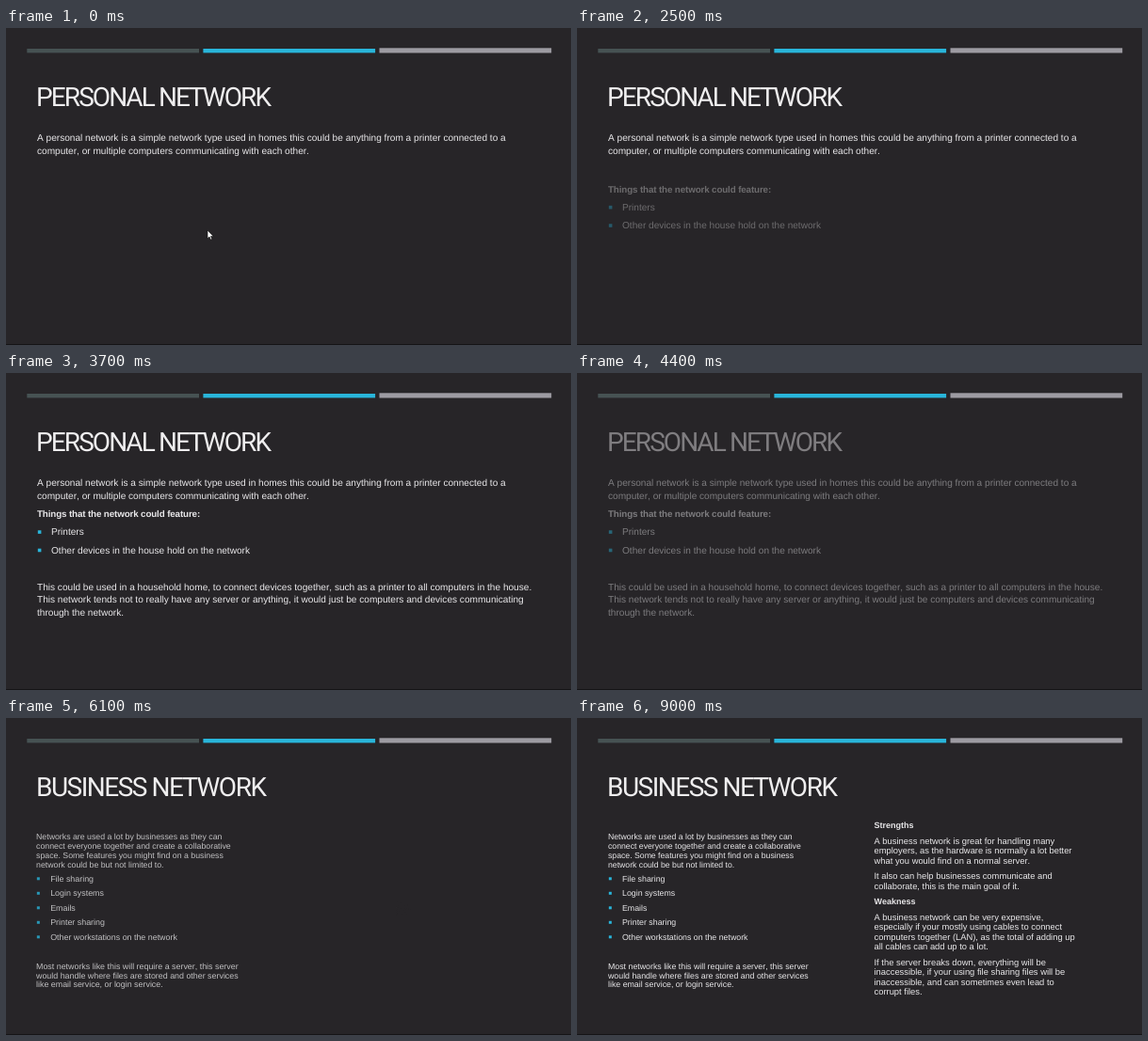
Write an HTML page with a canvas that moves like this. It is 600 px wide and 337 px high and loops after 9.1 s.

```html
<!DOCTYPE html>
<html lang="en">
<head>
<meta charset="utf-8">
<title>Network types</title>
<style>
html, body { margin: 0; width: 100%; height: 100%; overflow: hidden; background: #272528; }
canvas { display: block; width: 100vw; height: 100vh; }
</style>
</head>
<body>
<canvas id="stage" width="600" height="337"></canvas>
<script>
const ctx = document.getElementById('stage').getContext('2d');
const LOOP = 9100, STEP = 100;
const BG = '#272528', INK = '#e9e8ea', CYAN = '#29b5da';
const SANS = '"Liberation Sans", Arial, sans-serif';

// 0 before start, 1 after start + length, linear between
const ramp = (t, start, length) => Math.min(1, Math.max(0, (t - start) / length));

function text(str, x, y, font, spacing = 0, color = INK) {
  ctx.font = font;
  ctx.letterSpacing = spacing + 'px';
  ctx.fillStyle = color;
  ctx.fillText(str, x, y);
}

function lines(rows, x, y, lead, size) {
  rows.forEach((row, i) => text(row, x, y + i * lead, `${size}px ${SANS}`));
}

function bullets(rows, y, lead, size, dot) {
  rows.forEach((row, i) => {
    const base = y + i * lead;
    ctx.fillStyle = CYAN;
    ctx.fillRect(33.8, base - size * 0.33 - dot / 2, dot, dot);
    text(row, 48, base, `${size}px ${SANS}`);
  });
}

function title(str, spacing) {
  text(str, 32, 83, '28px Roboto, sans-serif', spacing, '#efeeef');
}

// Draws a part with its own opacity, shift and scale about a centre
function group(draw, { alpha = 1, dy = 0, sx = 1, sy = 1, cx = 0, cy = 0 } = {}) {
  if (alpha <= 0 || sx <= 0 || sy <= 0) return;
  ctx.save();
  ctx.globalAlpha = alpha;
  ctx.translate(cx, cy + dy);
  ctx.scale(sx, sy);
  ctx.translate(-cx, -cy);
  draw();
  ctx.restore();
}

function backdrop() {
  ctx.fillStyle = BG;
  ctx.fillRect(0, 0, 600, 337);
  ctx.fillStyle = '#151416';
  ctx.fillRect(0, 336, 600, 1);
  ['#465253', CYAN, '#9d9ba2'].forEach((color, i) => {
    ctx.fillStyle = color;
    ctx.fillRect(22.3 + i * 187.1, i === 2 ? 21.3 : 22, 182.7, i === 2 ? 5.2 : 4.4);
  });
}

function personalIntro() {
  title('PERSONAL NETWORK', -1.9);
  lines([
    'A personal network is a simple network type used in homes this could be anything from a printer connected to a',
    'computer, or multiple computers communicating with each other.'
  ], 33, 119.5, 14, 10.1);
}

function personalList() {
  text('Things that the network could feature:', 33, 153, `bold 9.8px ${SANS}`, -0.13);
  bullets(['Printers', 'Other devices in the house hold on the network'], 172.4, 19.4, 10.1, 3.6);
}

function personalUse() {
  lines([
    'This could be used in a household home, to connect devices together, such as a printer to all computers in the house.',
    'This network tends not to really have any server or anything, it would just be computers and devices communicating',
    'through the network.'
  ], 33, 230.6, 13.8, 10.1);
}

function businessLeft() {
  lines([
    'Networks are used a lot by businesses as they can',
    'connect everyone together and create a collaborative',
    'space. Some features you might find on a business',
    'network could be but not limited to.'
  ], 33, 129, 9.9, 8.7);
  bullets(['File sharing', 'Login systems', 'Emails', 'Printer sharing', 'Other workstations on the network'],
    173.7, 15.5, 8.8, 3);
  lines([
    'Most networks like this will require a server, this server',
    'would handle where files are stored and other services',
    'like email service, or login service.'
  ], 33, 266.8, 9.7, 8.8);
}

function businessRight() {
  const x = 315.5, lead = 10.45, size = 9.4, bold = `bold 9px ${SANS}`;
  text('Strengths', x, 117.2, bold);
  lines([
    'A business network is great for handling many',
    'employers, as the hardware is normally a lot better',
    'what you would find on a normal server.'
  ], x, 133.9, lead, size);
  lines([
    'It also can help businesses communicate and',
    'collaborate, this is the main goal of it.'
  ], x, 171.4, lead, size);
  text('Weakness', x, 198.2, bold);
  lines([
    'A business network can be very expensive,',
    'especially if your mostly using cables to connect',
    'computers together (LAN), as the total of adding up',
    'all cables can add up to a lot.'
  ], x, 214.9, lead, size);
  lines([
    'If the server breaks down, everything will be',
    'inaccessible, if your using file sharing files will be',
    'inaccessible, and can sometimes even lead to',
    'corrupt files.'
  ], x, 262.8, lead, size);
}

function pointer(t) {
  const p = ramp(t, 640, 360);
  if (p === 1) return;
  const k = p * p;
  ctx.save();
  ctx.translate(214 + 200 * k, 215 + 190 * k);
  ctx.beginPath();
  [[0, 0], [0, 8.8], [2, 7], [3.3, 10], [4.7, 9.4], [3.5, 6.5], [6.2, 6.4]]
    .forEach(([x, y]) => ctx.lineTo(x, y));
  ctx.closePath();
  ctx.fillStyle = '#fff';
  ctx.fill();
  ctx.strokeStyle = '#0c0c0c';
  ctx.lineWidth = 0.6;
  ctx.stroke();
  ctx.restore();
}

function personal(t) {
  const alpha = 1 - ramp(t, 4150, 450);
  group(personalIntro, { alpha });
  if (t >= 2300) {
    const rise = ramp(t, 2140, 1000);
    group(personalList, { alpha: alpha * rise, dy: 33.7 * (1 - rise) });
  }
  group(personalUse, { alpha: t < 3200 ? 0 : alpha, dy: 121 * (1 - ramp(t, 3115, 500)) });
  pointer(t);
}

function business(t) {
  if (t < 5000) return;
  group(() => title('BUSINESS NETWORK', -1.5), { dy: 335 * (1 - ramp(t, 4800, 500)) });
  const press = ramp(t, 5900, 250);
  group(businessLeft, { alpha: press, sx: 1 + 0.23 * (1 - press) ** 2, cx: 140 });
  const zoom = ramp(t, 6060, 500);
  group(businessRight, { alpha: zoom, sx: zoom, sy: zoom, cx: 422.5, cy: 202.5 });
}

function frame(now) {
  const t = Math.floor((now % LOOP) / STEP) * STEP;
  ctx.textRendering = 'geometricPrecision';
  ctx.fontKerning = 'none';
  backdrop();
  if (t < 4600) personal(t);
  else business(t);
  requestAnimationFrame(frame);
}
requestAnimationFrame(frame);
</script>
</body>
</html>
```
